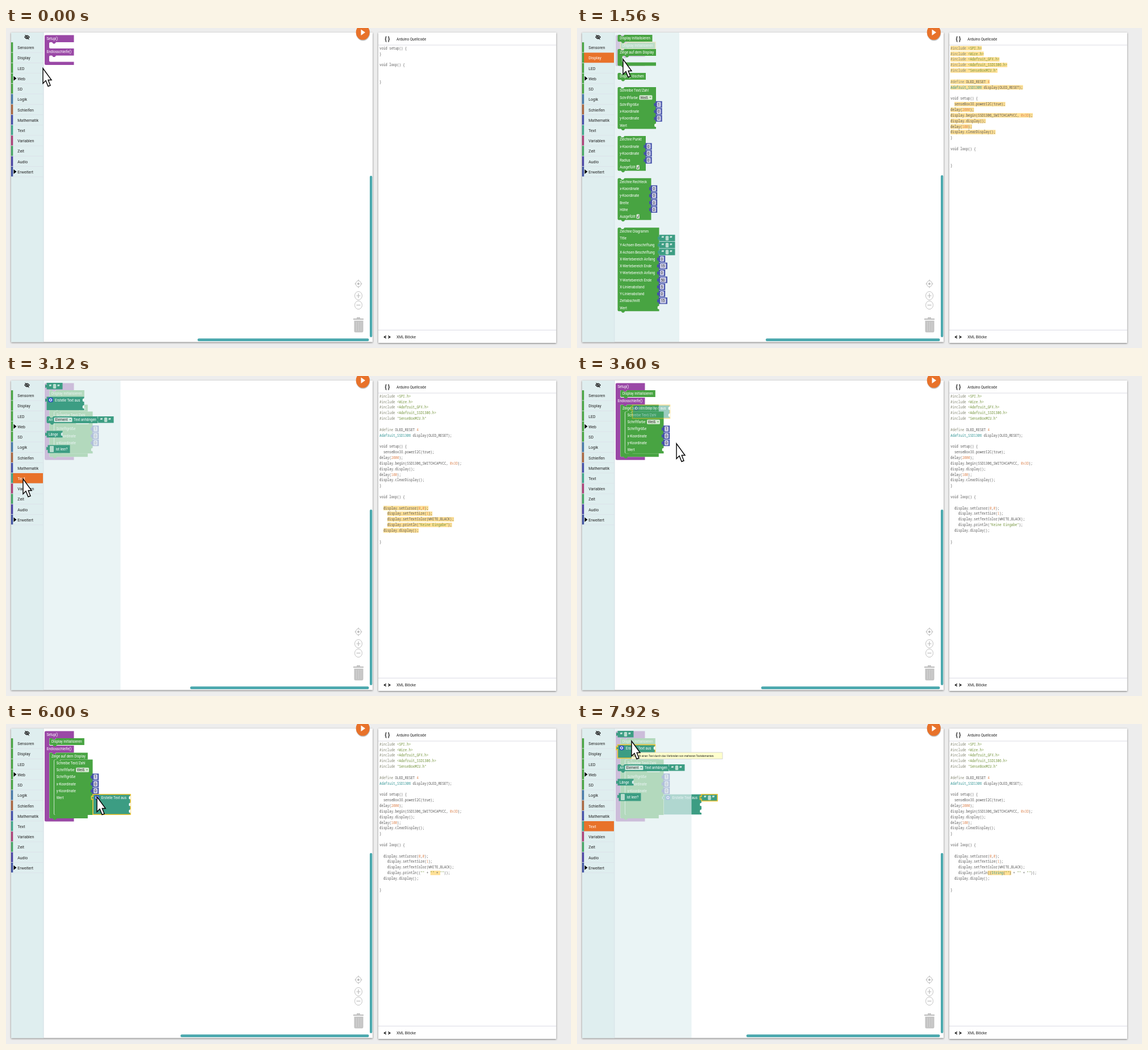
Write an HTML page that moves like this. It is 994x563 px and loops after 8 s.

```html
<!DOCTYPE html>
<html lang="de">
<head>
<meta charset="utf-8">
<title>Blockeditor</title>
<style>
  html, body { margin: 0; width: 100%; height: 100%; overflow: hidden; background: #ededed; }
  svg { display: block; width: 100vw; height: 100vh; font-family: Roboto, sans-serif; }
  text { white-space: pre; }
  .mono { font-family: "Noto Sans Mono", monospace; }
  .panel { fill: #fff; filter: drop-shadow(0 1px 1.5px rgba(0,0,0,.5)); }
</style>
</head>
<body>
<svg viewBox="0 0 994 563" preserveAspectRatio="none"><g id="base"></g><g id="live"></g></svg>
<script>
const LOOP = 8000, STEP = 120, SQUEEZE = .87;
const GREEN = '#48a442', PURPLE = '#9a48a6', TEAL = '#3c9d83', BLUE = '#4450a9',
      ORANGE = '#e8722a', GOLD = '#f3c32f', SCROLL = '#4aa8ad';

// ---------- drawing helpers ----------
const esc = s => String(s).replace(/&/g, '&amp;').replace(/</g, '&lt;');
const rect = (x, y, w, h, fill, more = '') =>
  `<rect x="${x}" y="${y}" width="${w}" height="${h}" fill="${fill}" ${more}/>`;
const path = (d, fill, more = '') => `<path d="${d}" fill="${fill}" ${more}/>`;
const line = (d, color, w = 1) => path(d, 'none', `stroke="${color}" stroke-width="${w}"`);
const markup = (x, y, inner, size, fill, more = '') =>
  `<text transform="translate(${x} ${y + size * .35}) scale(${SQUEEZE} 1)" font-size="${size}" fill="${fill}" ${more}>${inner}</text>`;
const label = (x, y, s, size = 7, fill = '#fff', more) => markup(x, y, esc(s), size, fill, more);
const edge = on => on ? `stroke="${GOLD}" stroke-width="1.5"` : '';

// ---------- blocks ----------
const DENT = 'l-2 2.5h-3l-2-2.5';

// slots: pairs of row height and opening height
function shape(x, y, w, h, slots = [], hat = false) {
  let d = `M${x} ${y + 2}q0-2 2-2` + (hat ? '' : 'h3l2 2.5h3l2-2.5') + `H${x + w}`, cy = y;
  for (const [row, gap] of slots) {
    cy += row;
    d += `V${cy}H${x + 20}${DENT}H${x + 10}q-2 0-2 2V${cy + gap - 2}q0 2 2 2H${x + w}`;
    cy += gap;
  }
  return d + `V${y + h}` + (hat ? '' : `H${x + 13}${DENT}`) + `H${x + 2}q-2 0-2-2z`;
}
const simple = (x, y, w, s, sel) => path(shape(x, y, w, 12), GREEN, edge(sel)) + label(x + 3.7, y + 6, s);
const show = (x, y, gap, sel) =>
  path(shape(x, y, 67.5, 18 + gap, [[12, gap]]), GREEN, edge(sel)) + label(x + 3.7, y + 6, 'Zeige auf dem Display');
const plug = (x, y, w, h, fill, sel) =>
  path(`M${x} ${y}h${w}v${h}h${-w}V${y + 8}l-2.5 1v-6l2.5 1z`, fill, edge(sel));
const socket = (x, y, fill = '#fff') => path(`M${x + .3} ${y - 3.5}v6.5l-3-1v-4z`, fill);

function num(x, y, v) {
  const w = 8 + String(v).length * 3.7;
  return plug(x, y - 5.8, w, 11.6, BLUE) + rect(x + 2.5, y - 4.5, w - 4.6, 9, '#c9cbe6', 'rx="1.5"') +
    label(x + 3.9, y, v, 7, '#333');
}
const str = (x, y, sel) => plug(x, y, 28, 11.6, TEAL, sel) +
  label(x + 4, y + 8, '“', 13, '#fff', 'font-weight="700"') + rect(x + 11.3, y + 2, 5.4, 8, '#b9dccf', 'rx="1.5"') +
  label(x + 18.6, y + 8, '”', 13, '#fff', 'font-weight="700"');

function join(x, y, n, sel) {
  let s = plug(x, y, 66, 11.8 * n, TEAL, sel) + rect(x + 3, y + 1.6, 8, 8, '#2a4bc4', 'rx="2"') +
    `<circle cx="${x + 7}" cy="${y + 5.6}" r="2" fill="none" stroke="#fff" stroke-width="1.2"/>` +
    label(x + 14.5, y + 5.8, 'Erstelle Text aus');
  for (let i = 0; i < n; i++) s += socket(x + 66, y + 6 + 11.9 * i);
  return s;
}

function form(x, y, w, title, rows, h = rows.length * 12.25 + 12.3) {
  let s = path(shape(x, y, w, h), GREEN) + label(x + 3.7, y + 6, title);
  rows.forEach(([name, v], i) => {
    const cy = y + 6 + 12.25 * (i + 1), r = x + w;
    s += label(x + 3.7, cy, name);
    if (v === 'Weiß') s += rect(x + 38, cy - 4, 23, 8, '#d3e9cf', 'rx="1.5"') + label(x + 39.7, cy, v, 7, '#333') +
      path(`M${x + 56} ${cy - 1}h3l-1.5 2z`, GREEN);
    else if (v === 'check') s += rect(x + 33, cy - 4, 5.5, 8, '#d3e9cf', 'rx="1.5"') +
      line(`M${x + 34.5} ${cy + .5}l1 2l2-5`, '#333', .8);
    else if (v === 'text') s += str(r, cy - 5.8);
    else if (v === 'open') s += socket(r, cy);
    else s += num(r - 1, cy, v);
  });
  return s;
}
const XY = [['x-Koordinate', 0], ['y-Koordinate', 0]], FILL = ['Ausgefüllt', 'check'];
const writeBlock = (x, y, h) => form(x, y, 67.5, 'Schreibe Text/Zahl',
  [['Schriftfarbe', 'Weiß'], ['Schriftgröße', 1], ...XY, ['Wert', 'open']], h);

// ---------- toolbox and flyouts ----------
const CATS = [['Sensoren', GREEN], ['Display', GREEN], ['LED', GREEN], ['Web', GREEN], ['SD', GREEN],
  ['Logik', '#4679a8'], ['Schleifen', '#a8653f'], ['Mathematik', BLUE], ['Text', '#41a58a'],
  ['Variablen', '#ab4078'], ['Zeit', '#45a565'], ['Audio', '#4b45a5'], ['Erweitert', '#4356a5']];
const rowY = i => 25.2 + 18.22 * i;

function toolbox(active, cx, cy) {
  const hover = cx > 9 && cx < 64 ? Math.floor((cy - 25.2) / 18.22) : -1;
  return CATS.map(([name, color], i) => {
    const y = rowY(i), on = name === active;
    return (on || i === hover ? rect(12, y, 53, 18, on ? ORANGE : '#fdc931') : '') +
      rect(9, y, 3.3, 17.4, color) + line(`M12 ${y + 18}H65`, '#dbe0e8', .7) +
      (name === 'Web' || name === 'Erweitert' ? path(`M13.5 ${y + 5}l5 4l-5 4z`, '#000') : '') +
      label(20.3, y + 9.2, name, 8, on ? '#fff' : '#222');
  }).join('');
}

const displayFlyout = () => rect(66, 8, 114, 544, '#e1f0f1', 'opacity=".76"') +
  simple(71.5, 12, 61, 'Display initialisieren') + show(71.5, 37, 11.5) + simple(71.5, 79, 49.5, 'Display löschen') +
  writeBlock(71.5, 104) +
  form(71.5, 190, 49.5, 'Zeichne Punkt', [...XY, ['Radius', 0], FILL]) +
  form(71.5, 264.3, 59, 'Zeichne Rechteck', [...XY, ['Breite', 0], ['Höhe', 0], FILL]) +
  form(71.5, 351.3, 73, 'Zeichne Diagramm', [['Title', 'text'], ['Y-Achsen Beschriftung', 'text'],
    ['X-Achsen Beschriftung', 'text'], ['X-Wertebereich Anfang', 0], ['X-Wertebereich Ende', 15],
    ['Y-Wertebereich Anfang', 0], ['Y-Wertebereich Ende', 50], ['X-Linienabstand', 5],
    ['Y-Linienabstand', 0], ['Zeitabschnitt', 15], ['Wert', 'open']]);

const textFlyout = sel => rect(66, 8, 135.5, 544, '#e1f0f1', 'opacity=".7"') +
  str(71.5, 12) + join(71.5, 36.5, 2, sel) +
  path(shape(71.5, 71, 89.5, 12), TEAL) + label(75, 77, 'An') + rect(84.5, 73, 32, 8, '#d0e8e0', 'rx="1.5"') +
  label(86.5, 77, 'Element', 7, '#333') + path('M111.500 76h3l-1.500 2z', TEAL) + label(119, 77, 'Text anhängen') + str(161.5, 71) +
  plug(71.5, 96.5, 28, 11.8, TEAL) + label(75, 102.4, 'Länge') + socket(99.5, 102.4, '#dcebea') +
  plug(73.5, 121.5, 39, 14, TEAL) + rect(77, 123, 7, 11, '#b9dccf', 'rx="1"') + label(87.5, 128.5, 'ist leer?');

function mutator(n) {
  const item = (x, y) => path(shape(x, y, 29, 12), TEAL) + label(x + 3.5, y + 6, 'Element');
  let s = path('M160 129L188 172L198 165z', '#bbb') + rect(184, 162, 122, 72, '#fff', 'stroke="#bbb" stroke-width="2"') +
    rect(185, 163, 42, 70, '#ddd') + item(190, 170) +
    path(shape(238, 169, 42, 17.5 + 12 * n, [[12, 12 * n]], true), TEAL) + label(242, 175, 'verbinden');
  for (let i = 0; i < n; i++) s += item(246, 181 + 12 * i);
  return s;
}

// ---------- timeline ----------
const INIT = 1320, SHOW = 2040, WRITE = 2880, JOIN = 3840, THIRD = 5400, QUOTE = 6720;
const within = (t, a, b) => t >= a && t < b;
const POINTER = [[0, 65, 71], [480, 40, 53], [600, 38, 52], [960, 92, 18], [INIT, 97, 31], [1560, 81, 55],
  [1680, 82, 46], [SHOW, 87, 60], [2520, 94, 126], [2640, 92, 112], [WRITE, 106, 71], [3120, 30, 181],
  [3360, 95, 43], [3600, 175, 119], [JOIN, 180, 132], [4440, 160, 129], [4920, 200, 177], [THIRD, 256, 212],
  [5760, 160, 128], [6000, 160, 128], [6240, 32, 182], [6480, 85, 18], [QUOTE, 232, 130], [7200, 41, 212],
  [7440, 34, 183], [7800, 96, 30], [LOOP, 96, 30]];
const DRAGS = [
  [[[960, 71.5, 12], [INIT, 76, 25]], (x, y) => simple(x, y, 61, 'Display initialisieren', true)],
  [[[1680, 71.5, 37], [SHOW, 76, 50.5]], (x, y) => show(x, y, 11, true)],
  [[[2640, 71.5, 104], [WRITE, 84.5, 62.5]], (x, y) => writeBlock(x, y)],
  [[[3360, 71.5, 36.5], [3600, 97.5, 51], [JOIN, 153, 124]], (x, y) => `<g opacity=".5">${join(x, y, 2, true)}</g>`],
  [[[4920, 190, 170], [THIRD, 246, 205]], (x, y) => path(shape(x, y, 29, 12), TEAL, edge(true)) + label(x + 3.5, y + 6, 'Element')],
  [[[6480, 71.5, 12], [QUOTE, 219, 123.8]], (x, y) => str(x, y, true)]
];
function along(keys, t) {
  let i = 1;
  while (i < keys.length - 1 && t >= keys[i][0]) i++;
  const [a, ax, ay] = keys[i - 1], [b, bx, by] = keys[i];
  const k = Math.min(1, Math.max(0, (t - a) / (b - a))), e = k * k * (3 - 2 * k);
  return [ax + (bx - ax) * e, ay + (by - ay) * e];
}

function workspace(t) {
  const n = t >= THIRD ? 3 : t >= JOIN ? 2 : 0;
  const inner = t < WRITE ? 11 : n ? 73.8 + 11.9 * (n - 1) : 73.8;
  const first = t >= INIT ? 13 : 11, second = t >= SHOW ? 18 + inner : 11;
  let s = path(shape(68, 12.5, 51.5, 30.5 + first + second, [[12.5, first], [12.5, second]], true), PURPLE) +
    label(71.5, 18.5, 'Setup()') + label(71.5, 31 + first, 'Endlosschleife()');
  if (t >= INIT) s += simple(76.3, 25, 61.5, 'Display initialisieren', t < SHOW);
  if (t >= SHOW) s += show(76.3, 50.5, inner, t < WRITE);
  if (t >= WRITE) s += writeBlock(85, 62.5, inner);
  if (n) s += join(153, 123.8, n, t < QUOTE);
  if (t >= QUOTE) s += str(219, 123.8, true);
  return s;
}

function scrollbars(t) {
  const [x, y] = t >= QUOTE ? [298, 227] : t >= THIRD ? [307, 227] : t >= JOIN ? [307, 231] :
    t >= WRITE ? [324, 235] : t >= SHOW ? [330, 254] : t >= INIT ? [332, 259] : [337, 260];
  return rect(640, y, 4.3, 544 - y, SCROLL, 'rx="2"') + rect(x, 546.2, 638.5 - x, 4.8, SCROLL, 'rx="2.2"');
}

// ---------- source code panel; ¦ marks highlighted text ----------
const mark = (on, s) => on && s ? s.replace(/\S.*/, '¦$&¦') : s;
const HEAD = ['#include <SPI.h>', '#include <Wire.h>', '#include <Adafruit_GFX.h>', '#include <Adafruit_SSD1306.h>',
  '#include "SenseBoxMCU.h"', '', '#define OLED_RESET 4', 'Adafruit_SSD1306 display(OLED_RESET);', ''];
const SETUP = ['  senseBoxIO.powerI2C(true);', 'delay(2000);', 'display.begin(SSD1306_SWITCHCAPVCC, 0x3D);',
  'display.display();', 'delay(100);', 'display.clearDisplay();'];

function sourceLines(t) {
  const fresh = s => mark(t < SHOW, s);
  const arg = t >= QUOTE ? '¦((String("")¦ + "" + ""))' : t >= THIRD ? '(("" + ¦"" + ¦""))' :
    t >= JOIN ? (t < 4440 ? '(¦("" + "")¦)' : '(("" + ""))') : '("Keine Eingabe")';
  const body = t >= WRITE
    ? ['  display.setCursor(0,0);', '    display.setTextSize(1);', '    display.setTextColor(WHITE,BLACK);',
       `    display.println${arg};`, '  display.display();'].map(s => mark(t < 3480, s))
    : t >= SHOW ? ['¦display.display();¦'] : [];
  const started = t >= INIT;
  return [...(started ? HEAD.map(fresh) : []), 'void setup() {', ...(started ? SETUP.map(fresh) : []), '}', '',
    'void loop() {', '', ...body, '', '}'];
}
const paint = s => s.split(/(#\w+|<[^>]+>|"[^"]*"|^Adafruit_SSD1306|String|\b0x3D\b|\b\d+\b)/).map((p, i) => {
  if (i % 2 === 0) return esc(p);
  const c = p[0] === '#' ? '#878a76' : /^[<"]/.test(p) ? '#719238' : /^\d/.test(p) ? '#dc8450' : '#2d9292';
  return `<tspan fill="${c}">${esc(p)}</tspan>`;
}).join('');

function source(t) {
  const cw = 3.45;
  return sourceLines(t).map((s, i) => {
    const y = 35.4 + 9.846 * i, [a, b] = s.split('¦');
    return (b ? rect(657 + a.length * cw, y - 3.8, b.length * cw, 7.8, '#ffe096') : '') +
      markup(657, y, paint(s.replace(/¦/g, '')), 6.61, '#555', 'class="mono"');
  }).join('');
}

// ---------- scene ----------
const ring = (y, d) => `<ellipse cx="620" cy="${y}" rx="6.5" ry="7.3" fill="none" stroke="#c2c2c2"/>` + line(d, '#bbb', 1.2);
const controls = () =>
  `<ellipse cx="620" cy="450" rx="4.700" ry="5.300" fill="none" stroke="#bbb"/><circle cx="620" cy="450" r="2" fill="#bbb"/>` +
  line('M620 442.500v3M620 454.500v3M613.500 450h2.500M624 450h2.500', '#bbb') +
  ring(471, 'M616.500 471h7M620 467v8') + ring(487.5, 'M616.500 487.500h7') +
  path('M611 511h6v-2h6v2h6v2.500h-18zM612.500 515h16v18q0 2.500-2 2.500h-12q-2 0-2-2.500z', '#c4c4c4') +
  line('M616.500 517v16M620.500 517v16M624.500 517v16', '#d3d3d3');
const play = () => `<ellipse cx="628" cy="9" rx="12.2" ry="13.5" fill="#000" opacity=".25"/>` +
  `<ellipse cx="627.7" cy="7.500" rx="12" ry="13.300" fill="${ORANGE}"/>` + path('M624.500 2.500v10.500l7.500-5.200z', '#fff');
const eye = () => path('M33 16q4-5.500 8 0q-4 5.500-8 0z', 'none', 'stroke="#222" stroke-width="1.3"') +
  `<circle cx="37" cy="16" r="1.5" fill="#222"/>` + line('M33.500 12l7 8.500', '#222', 1.1);

document.getElementById('base').innerHTML =
  rect(0, 0, 994, 563, '#ededed') + rect(9, 8, 636, 544.5, '#fff', 'class="panel"') +
  rect(655, 8, 313, 546, '#fff', 'class="panel"') + rect(9, 8, 57, 544.5, '#dfeeef') + line('M66 8V552', '#d2dde3') +
  line('M655 30H968M655 531.500H968', '#dcdce4') + eye() +
  label(666.5, 19, '{ }', 11, '#111', 'font-weight="700"') + label(687, 19, 'Arduino Quellcode', 7.35, '#222') +
  label(664.5, 543, '< >', 11, '#111', 'font-weight="900"') + label(687, 543, 'XML Blöcke', 7.4, '#222');

const live = document.getElementById('live');
function draw(t) {
  const [cx, cy] = along(POINTER, t);
  const showing = within(t, 600, 3000) ? 'Display' :
    within(t, 3120, 3480) || within(t, 6240, 6600) || t >= 7440 ? 'Text' : '';
  let s = workspace(t) + toolbox(showing, cx, cy) + controls() + scrollbars(t) + source(t);
  if (showing === 'Display') s += displayFlyout();
  if (showing === 'Text') s += textFlyout(t >= 7440);
  if (within(t, 4440, 5760)) s += mutator(t >= THIRD ? 3 : 2);
  for (const [keys, block] of DRAGS)
    if (within(t, keys[0][0], keys[keys.length - 1][0])) s += block(...along(keys, t));
  if (t >= 7800) s += rect(96, 50, 160, 11.5, '#ffffcc', 'stroke="#ccc" stroke-width=".8"') +
    label(98, 56, 'Erstellt einen Text durch das Verbinden von mehreren Textelementen.', 5.4, '#222');
  s += play() + path('M0 0V26.500L5 21.500L9 31.500L13 30L9.200 20.500H15z', '#fff',
    `stroke="#000" stroke-width="1.4" transform="translate(${cx} ${cy})"`);
  live.innerHTML = s;
}

let last = -1;
function tick() {
  const step = Math.floor(performance.now() % LOOP / STEP);
  if (step !== last) draw((last = step) * STEP);
  requestAnimationFrame(tick);
}
tick();
</script>
</body>
</html>
```
